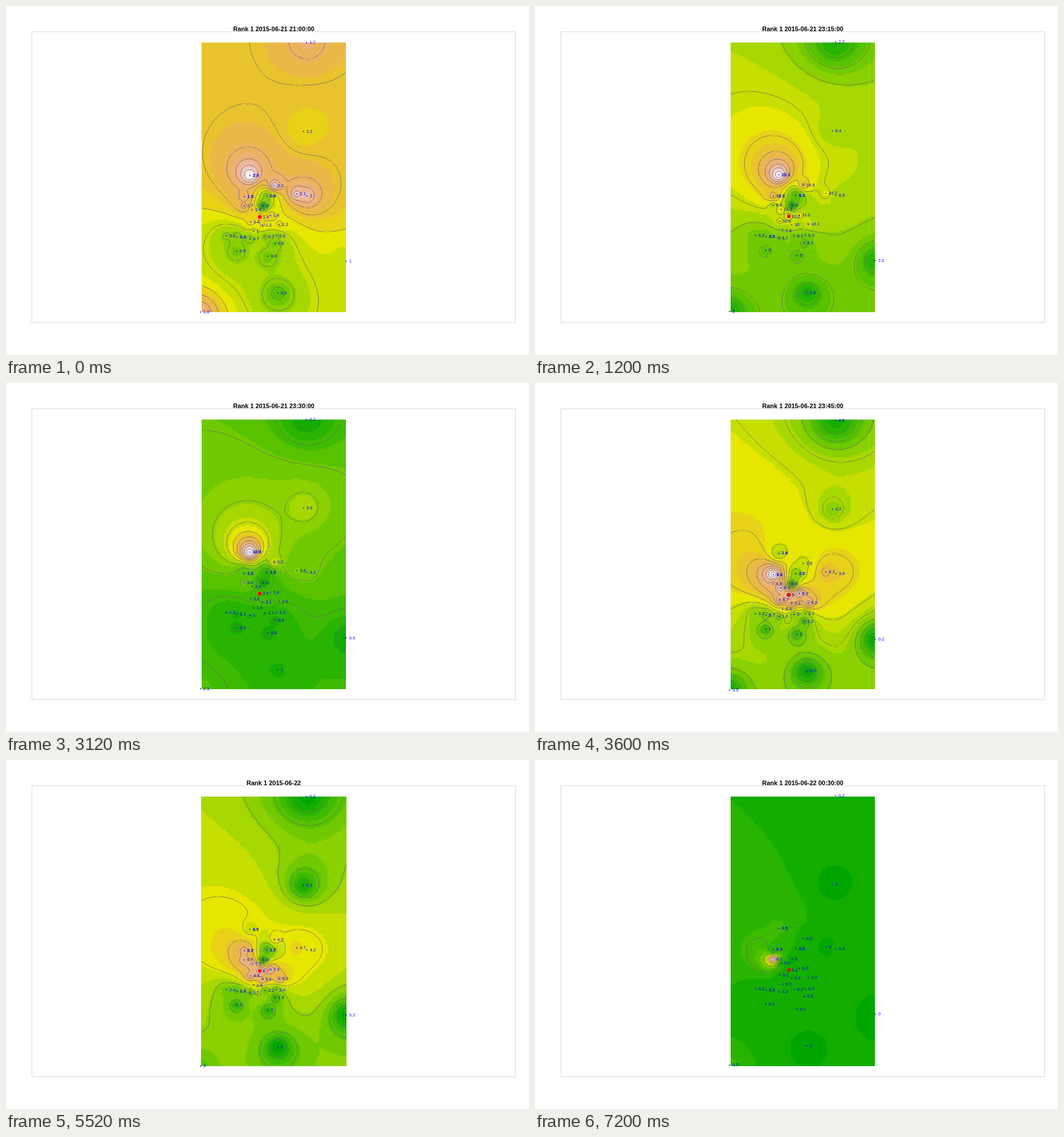
Animation of 917 by 611 pixels, one loop 8 s. Source, as an HTML page with a canvas:

```html
<!DOCTYPE html>
<html>
<head>
<meta charset="utf-8">
<style>
html, body { margin: 0; width: 100%; height: 100%; overflow: hidden; background: #fff; }
canvas { display: block; }
</style>
</head>
<body>
<canvas id="stage" width="917" height="611"></canvas>
<script>
const ctx = document.getElementById('stage').getContext('2d');
const FONT = '"Liberation Sans", Arial, sans-serif';
const HOLD = 1200, LOOP = 8000, TOP = 64, BOTTOM = 536, CELL = 3, COLOURS = 20;

const parsePlaces = text => text.split(' ').map(p => p.split(',').map(Number));

// Key stations carry a reading per scene, in this order
const keyPlaces = parsePlaces('527,64 521.5,219.5 427.5,296.5 470.5,314.3 510,329 527.5,332.5 ' +
  '418,333.8 457.5,332.5 417.5,350 445,369.3 476.5,502.5 596.5,446.8 341,535.8');
// Readings of the inner group follow from how far south they lie
const groupPlaces = parsePlaces('431.5,357 463.5,366.8 429,378 450,383.8 479,382.8 434,394.3 386.5,402.3 ' +
  '405,404.8 428,407.5 454.5,403.5 474,402.3 472,415.8 404.5,429 459,438');
const calmPlace = [451, 350], HUB = 9, KEY_TWINS = [2, 6, 7], GROUP_TWIN = 7;

const scenes = [
  { title: '2015-06-21 21:00:00', dy: 0, north: 1.4, south: .6, keys: '1.7 1.2 2.4 2.2 2.1 2 1.7 .7 1.7 1.4 .5 1 1.8' },
  { title: '2015-06-21 23:15:00', dy: -1, north: 11.3, south: 5, keys: '2.2 8.4 23.2 14.5 10.7 8.5 14.8 4.7 8.6 11.3 1.8 2.2 2' },
  { title: '2015-06-21 23:30:00', dy: -.5, north: 2.4, south: .8, keys: '.7 4.6 11.7 5.2 3.6 3.2 2.3 1.4 3.4 2.3 1 .5 2.5' },
  { title: '2015-06-21 23:45:00', dy: 1.7, north: 6.3, south: 1, keys: '.5 2.2 2.6 2.8 4.2 3.8 6.8 2 4.8 6 .2 .2 .5' },
  { title: '2015-06-22', dy: 0, grow: 1, north: 7.5, south: 1, keys: '.2 .7 3.8 4.5 4.7 4.2 6.3 1.6 6.7 8.7 0 .2 2' },
  { title: '2015-06-22 00:15:00', dy: -1.5, grow: 2, north: 1.4, south: 1.5, keys: '1.2 .5 7.4 4.2 3.4 2.8 2.8 1.1 3.4 1.4 .5 .5 1.2' },
  { title: '2015-06-22 00:30:00', dy: -1.7, north: .2, south: .15, keys: '.2 0 .5 .2 0 .2 .3 .3 3.1 .2 0 0 .5' }
];

// Green to yellow to near-white terrain ramp
const palette = Array.from({ length: COLOURS }, (_, i) => {
  const low = i < 10, t = low ? i / 9 : (i - 9) / 10;
  const high = 255 * (low ? .65 + .25 * t : .9 + .05 * t);
  const r = low ? high * t : high;
  const b = low ? 0 : high * t;
  const g = low ? high : b + (high - b) * (1 - t);
  return `rgb(${[r, g, b].map(Math.round)})`;
});

function readPoints({ keys, north, south, dy }) {
  const point = ([x, y], value, twin, hub) => ({ x, y: y + dy, value, hub, weight: twin ? 2 : 1,
    labels: (twin ? [value * 1.09, value * .91] : [value]).map(v => String(+v.toFixed(1))) });
  const bySouth = y => south + (north - south) / (1 + Math.exp((y - 393) / 7));
  return [
    point(calmPlace, 0),
    ...keys.split(' ').map((v, i) => point(keyPlaces[i], +v, KEY_TWINS.includes(i), i === HUB)),
    ...groupPlaces.map((place, i) => point(place, bySouth(place[1]), i === GROUP_TWIN))
  ];
}

// Inverse squared distance interpolation
function interpolate(points, x, y) {
  let sum = 0, total = 0;
  for (const p of points) {
    const w = p.weight / ((p.x - x) ** 2 + (p.y - y) ** 2 + 1e-6);
    sum += p.value * w;
    total += w;
  }
  return sum / total;
}

function drawField(points, grow = 0) {
  const left = 343 - grow, right = 596 + Math.min(grow, 2);
  const cols = Math.round((right - left) / CELL), rows = Math.round((BOTTOM - TOP) / CELL);
  const px = c => left + c * (right - left) / cols;
  const py = r => TOP + .4 + r * (BOTTOM - TOP - .4) / rows;
  const max = Math.max(...points.map(p => p.value));
  const step = [.2, .5, 1, 2].find(s => s >= max / 15);
  const corners = [], lines = [], tags = [];

  for (let r = 0; r <= rows; r++) {
    corners.push([]);
    for (let c = 0; c <= cols; c++) {
      corners[r].push(interpolate(points, px(c), py(r)));
      if (r === rows || c === cols) continue;
      const v = interpolate(points, px(c + .5), py(r + .5));
      ctx.fillStyle = palette[Math.min(COLOURS - 1, Math.floor(v / max * COLOURS))];
      const x = Math.round(px(c)), y = Math.round(py(r));
      ctx.fillRect(x, y, Math.round(px(c + 1)) - x, Math.round(py(r + 1)) - y);
    }
  }

  // Marching squares; a level is written where its line runs flat and has room
  for (let r = 0; r < rows; r++) for (let c = 0; c < cols; c++) {
    const ring = [[c, r], [c + 1, r], [c + 1, r + 1], [c, r + 1]];
    const v = ring.map(([i, j]) => corners[j][i]);
    const top = Math.max(...v);
    const across = Math.abs(v[1] + v[2] - v[0] - v[3]), down = Math.abs(v[2] + v[3] - v[0] - v[1]);
    for (let k = Math.ceil(Math.min(...v) / step); k * step < top; k++) {
      const level = k * step, hits = [];
      for (let e = 0; e < 4; e++) {
        const n = (e + 1) % 4;
        if (v[e] < level === v[n] < level) continue;
        const t = (level - v[e]) / (v[n] - v[e]);
        hits.push([px(ring[e][0] + t * (ring[n][0] - ring[e][0])),
                   py(ring[e][1] + t * (ring[n][1] - ring[e][1]))]);
      }
      lines.push(hits);
      if (!hits.length) continue;
      const [x, y] = hits[0];
      const roomy = x > left + 6 && x < right - 6 && y > TOP + 4 && down < step * .6 &&
        tags.every(t => Math.hypot(t.x - x, t.y - y) > 22);
      if (roomy && across < .05 * down) tags.push({ x, y, text: String(+level.toFixed(1)) });
    }
  }

  ctx.save();
  ctx.beginPath();
  ctx.rect(left, TOP, right - left, BOTTOM - TOP);
  for (const { x, y, text } of tags) {
    const w = 4 + text.length * 3;
    ctx.rect(x - w / 2, y - 3, w, 6);
  }
  ctx.clip('evenodd');
  ctx.beginPath();
  for (const hits of lines) hits.forEach((p, i) => i % 2 ? ctx.lineTo(...p) : ctx.moveTo(...p));
  ctx.strokeStyle = '#666';
  ctx.lineWidth = .8;
  ctx.stroke();
  ctx.restore();

  ctx.font = `5.5px ${FONT}`;
  ctx.textAlign = 'center';
  ctx.fillStyle = 'rgba(130, 110, 80, .75)';
  for (const { x, y, text } of tags) ctx.fillText(text, x, y + 2);
}

function drawPoint({ x, y, labels, hub }) {
  ctx.fillStyle = hub ? '#f00' : '#00c';
  ctx.beginPath();
  ctx.arc(x, y, hub ? 3.2 : 1, 0, 7);
  ctx.fill();
  ctx.fillStyle = '#00f';
  for (const text of labels) ctx.fillText(text, x + 5.2, y + 2.2);
}

function drawScene(scene) {
  const points = readPoints(scene);
  ctx.fillStyle = '#fff';
  ctx.fillRect(0, 0, 917, 611);
  ctx.strokeStyle = '#d8d8d8';
  ctx.lineWidth = 1;
  ctx.strokeRect(45.5, 45, 848, 509.5);
  drawField(points, scene.grow);

  ctx.fillStyle = '#000';
  ctx.textAlign = 'center';
  ctx.font = `bold 11px ${FONT}`;
  ctx.fillText('Rank 1 ' + scene.title, 469.5, 44);

  ctx.textAlign = 'left';
  ctx.font = `7.5px ${FONT}`;
  points.forEach(drawPoint);
}

let shown = -1;
function tick() {
  const index = Math.floor(performance.now() % LOOP / HOLD);
  if (index !== shown) drawScene(scenes[shown = index]);
  requestAnimationFrame(tick);
}
tick();
</script>
</body>
</html>
```
